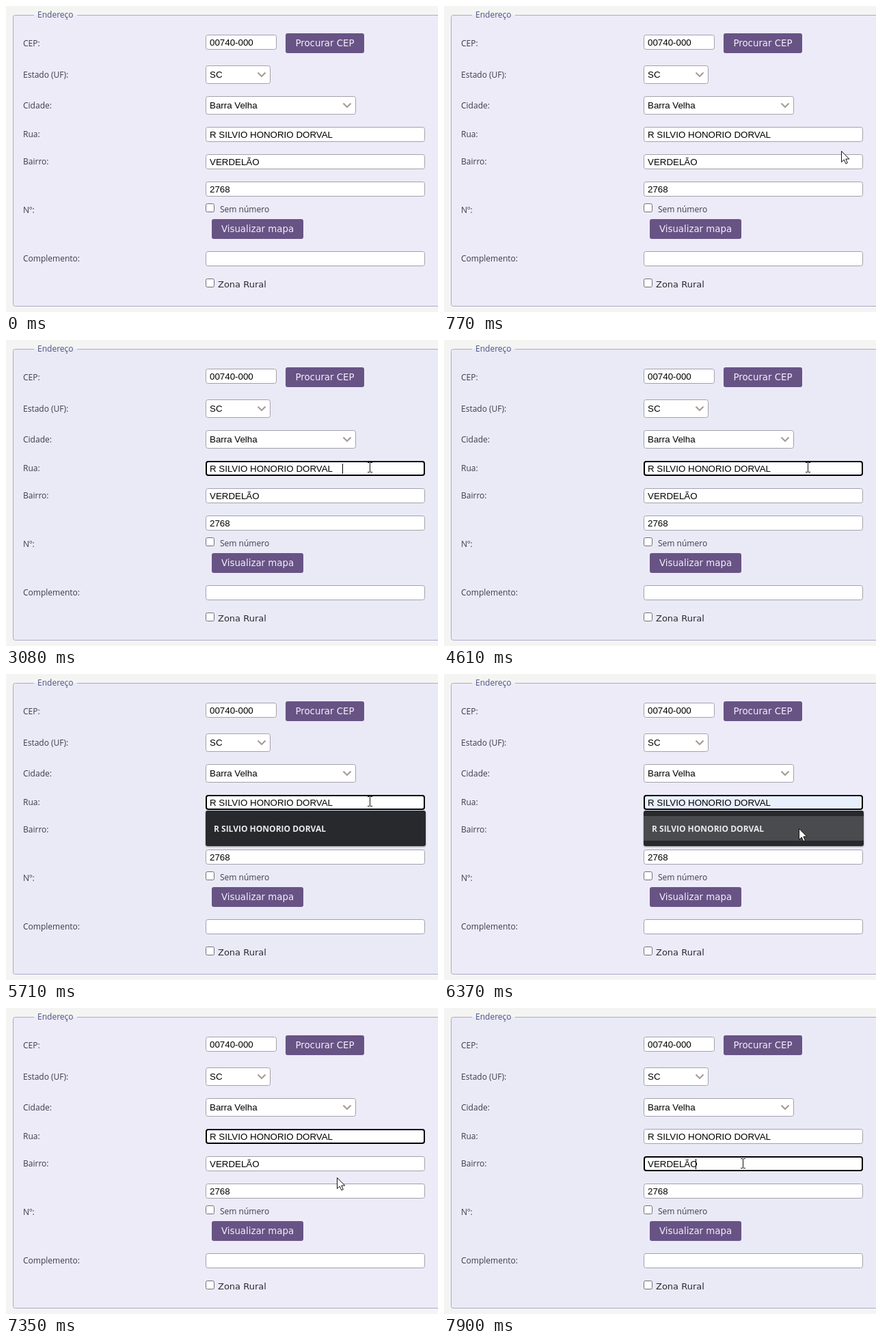
These frames come from a looping animation (632x448 px, 8 s). An HTML page:

```html
<!DOCTYPE html>
<html lang="pt-BR">
<head>
<meta charset="utf-8">
<title>Endereço</title>
<style>
html, body { margin: 0; width: 100%; height: 100%; overflow: hidden; background: #f4f5f2; }
svg { display: block; width: 632px; height: 448px; }
text { white-space: pre; }
.label { font: 12px "Open Sans", sans-serif; fill: #3b3b4a; }
.legend { font: 12px "Open Sans", sans-serif; fill: #4a5182; }
.value { font: 13.333px "Liberation Sans", Arial, sans-serif; fill: #000; }
.wide { font: 13px "DejaVu Sans", Verdana, sans-serif; fill: #2a2a33; }
.button { font: 13.333px "DejaVu Sans", Verdana, sans-serif; fill: #f3effa; text-anchor: middle; }
.item { font: bold 12px "Open Sans", sans-serif; fill: #e8eaed; }
.box { fill: #fff; stroke: #a3a0aa; }
.check { fill: #fff; stroke: #6f6f76; }
.box.hover { stroke: #8f68bd; }
.box.focus { stroke: #000; stroke-width: 2; }
.box.preview { fill: #e8f0fe; }
#popup { filter: drop-shadow(0 1px 1px rgba(0, 0, 0, .35)); }
</style>
</head>
<body>
<svg id="stage" viewBox="0 0 632 448" xmlns="http://www.w3.org/2000/svg"></svg>
<script>
const LOOP = 8000;
const STREET = 'R SILVIO HONORIO DORVAL';
const stage = document.getElementById('stage');

function add(tag, attrs, parent = stage) {
  const el = document.createElementNS(stage.namespaceURI, tag);
  for (const name in attrs) el.setAttribute(name, attrs[name]);
  parent.append(el);
  return el;
}

function write(cls, x, y, content, parent) {
  add('text', { class: cls, x, y }, parent).textContent = content;
}

function box(x, y, w, h, cls = 'box', rx = 3) {
  return add('rect', { class: cls, x: x + .5, y: y + .5, width: w - 1, height: h - 1, rx });
}

function field(y, content, w = 321) {
  const el = box(292, y, w, 22);
  write('value', 298, y + 16, content);
  return { el, y };
}

function select(y, w, content) {
  box(292, y, w, 27);
  write('value', 298, y + 18, content);
  add('path', {
    d: `M${292 + w - 18.5} ${y + 10.5}l5.5 5.5l5.5 -5.5`,
    fill: 'none', stroke: '#a89c96', 'stroke-width': 2.2
  });
}

function button(x, y, w, content) {
  add('rect', { x, y, width: w, height: 29, rx: 3, fill: '#685385' });
  write('button', x + w / 2, y + 19, content);
}

// Panel and static labels
const panel = add('rect', { x: 10.5, y: 13.5, width: 640, height: 426, rx: 3, stroke: '#aca7cd' });
const gap = add('rect', { x: 41, y: 13, width: 63, height: 1 });
write('legend', 46, 17, 'Endereço');
[['CEP:', 59], ['Estado (UF):', 105], ['Cidade:', 150], ['Rua:', 192],
 ['Bairro:', 232], ['Nº:', 303], ['Complemento:', 374]]
  .forEach(([name, y]) => write('label', 25, y, name));

// Controls
field(42, '00740-000', 104);
button(409, 40, 115, 'Procurar CEP');
select(87, 95, 'SC');
select(132, 220, 'Barra Velha');
const street = field(177, STREET);
const district = field(217, 'VERDELÃO');
const number = field(257, '2768');
const fields = [street, district, number, field(359, '')];
box(292, 289, 13, 13, 'check', 2);
write('label', 313, 302, 'Sem número');
button(301, 312, 134, 'Visualizar mapa');
box(292, 399, 13, 13, 'check', 2);
write('wide', 310, 412, 'Zona Rural');

const caret = add('rect', { width: 1, height: 15, fill: '#000' });

// Suggestion list
const popup = add('g', { id: 'popup' });
add('rect', { x: 292, y: 200, width: 322, height: 52, rx: 3, fill: '#28292c' }, popup);
const item = add('rect', { x: 292, y: 208, width: 322, height: 36, fill: '#4a4b4e' }, popup);
write('item', 304, 231, STREET, popup);

// Pointers, drawn around their hot spot
const beam = add('path', {
  d: 'M-3 -6.5H0M1 -6.5H4M.5 -6V7M-3 7.5H0M1 7.5H4', fill: 'none', stroke: '#111'
});
const arrow = add('path', {
  d: 'M.5 .5V16.5L4.2 13L6.8 18.8L9.3 17.7L6.8 12H11.8Z', fill: '#fff', stroke: '#111'
});

// Each row holds from its time until the next: time, x, y
const pointer = [
  [440, 617, 262], [550, 608, 243], [660, 596, 226], [770, 581, 212],
  [880, 566, 202], [990, 551, 194], [1100, 541, 189], [1210, 535, 187],
  [1320, 533, 187], [1430, 532, 186], [6260, 523, 212], [6370, 519, 226],
  [6480, 518, 229], [6590, 518, 230], [6920, 521, 268], [7030, 513, 264],
  [7140, 500, 257], [7250, 484, 248], [7360, 467, 240], [7470, 453, 233],
  [7580, 443, 229], [7680, 437, 227]
];

// time, x, y; no place means hidden
const carets = [
  [1980, 492, 181], [2530], [3080, 492, 181], [3620], [4070, 489, 181],
  [4400, 485, 181], [4610], [5060, 485, 181], [5170, 481, 181], [5710],
  [7900, 368, 221]
];

const at = (rows, t) => rows.findLast(row => row[0] <= t) || [];
const show = (el, on) => el.setAttribute('visibility', on ? 'inherit' : 'hidden');
const move = (el, x, y) => el.setAttribute('transform', `translate(${x} ${y})`);

function draw(t) {
  const open = t >= 5170 && t < 6700;
  const focused = t >= 7900 ? district : t >= 1980 ? street : null;
  const [, x, y] = at(pointer, t);
  const inside = x !== undefined;
  const onPopup = open && inside && y >= 200 && y < 252;
  const onItem = onPopup && y >= 208 && y < 244;
  const over = onPopup ? null : fields.find(f => x >= 292 && x < 613 && y >= f.y && y < f.y + 22);

  const cool = t >= 1980 && t < 6260 || t >= 7900;
  const tint = cool ? '#eaeaf7' : '#edebf8';
  panel.setAttribute('fill', tint);
  gap.setAttribute('fill', tint);

  for (const f of fields) {
    const inset = f === focused ? 1 : .5;
    f.el.setAttribute('x', 292 + inset);
    f.el.setAttribute('y', f.y + inset);
    f.el.setAttribute('width', 321 - 2 * inset);
    f.el.setAttribute('height', 22 - 2 * inset);
    f.el.classList.toggle('focus', f === focused);
    f.el.classList.toggle('hover', f === over && f !== focused);
  }
  street.el.classList.toggle('preview', onItem);

  show(popup, open);
  show(item, open && onItem);

  const [, cx, cy] = at(carets, t);
  show(caret, cx !== undefined);
  if (cx !== undefined) move(caret, cx, cy);

  show(beam, inside && over);
  show(arrow, inside && !over);
  if (inside) [beam, arrow].forEach(el => move(el, x, y));
}

function tick() {
  draw(performance.now() % LOOP);
  requestAnimationFrame(tick);
}
tick();
</script>
</body>
</html>
```
